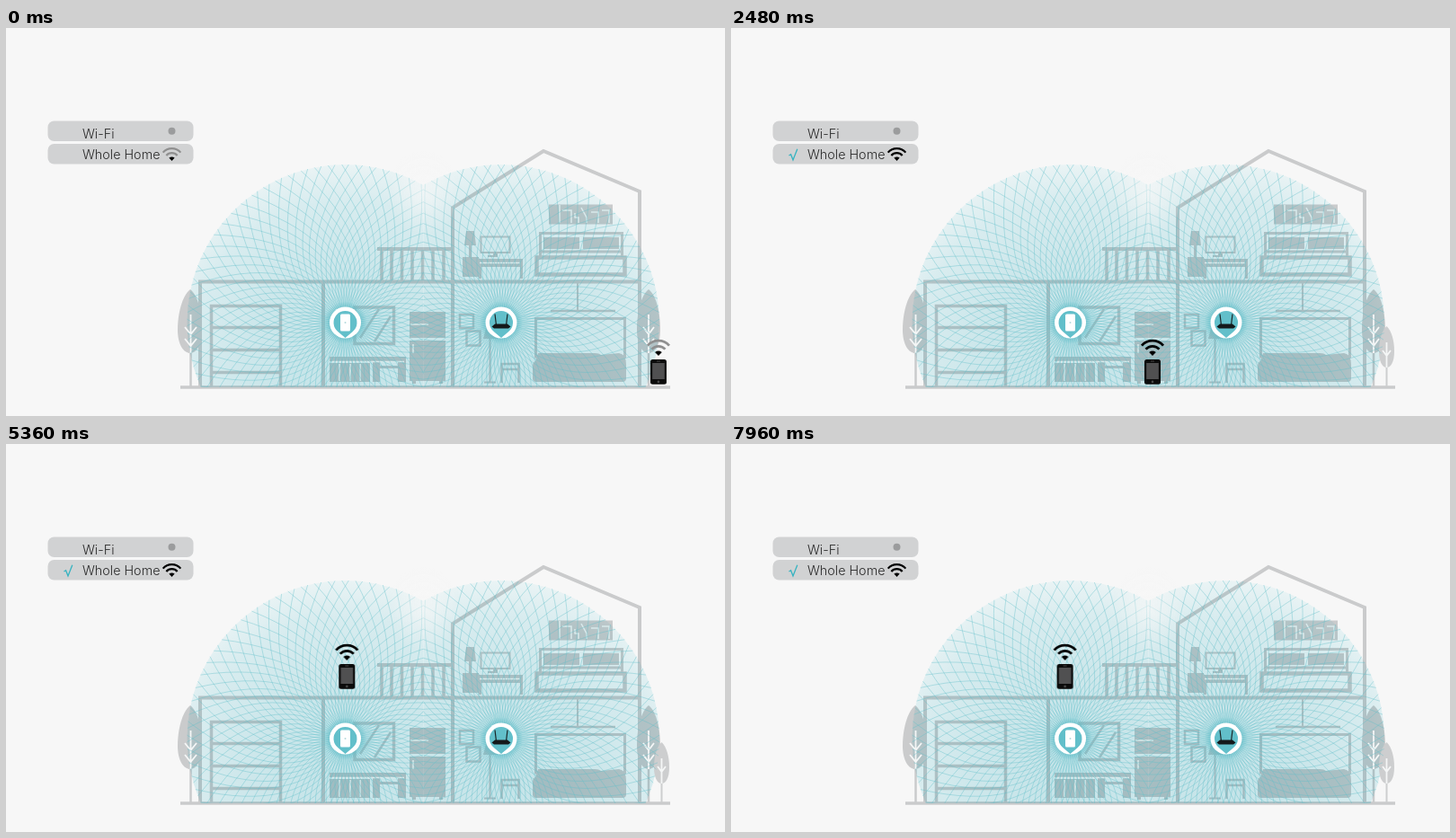
These frames come from a looping animation (800x432 px, 8000 ms). An HTML page:

```html
<!DOCTYPE html>
<html lang="en">
<head>
<meta charset="utf-8">
<title>Whole home Wi-Fi</title>
<style>
  html, body { margin: 0; width: 100%; height: 100%; overflow: hidden; background: #f7f7f7; }
  svg { display: block; width: 800px; height: 432px; }
  text { font: 300 14.35px Inter, "Open Sans", sans-serif; fill: #2b2b2b; }
  .house { mix-blend-mode: multiply; fill: none; stroke: #d1d2d3; }
  .solid { fill: #d1d2d3; stroke: none; }
  .twig { fill: none; stroke: #f4f6f6; stroke-width: 1.8; }
  .mesh { fill: none; stroke: #62bfc8; stroke-width: .6; opacity: .68; }

  .phone { animation: walk 8s linear infinite; }
  @keyframes walk {
    0% { transform: translate(726px, 0); }
    26%, 32.5% { transform: translate(469px, 0); }
    42.5% { transform: translate(395.5px, 0); animation-timing-function: cubic-bezier(.3, .15, .75, .675); }
    63.75% { transform: translate(394px, -124px); animation-timing-function: cubic-bezier(.3, .15, .75, .675); }
    83.5%, 87% { transform: translate(256px, -124px); }
    100% { transform: translate(376.1px, -124px); }
  }
  .mid, .outer { fill: none; stroke: #000; stroke-width: 2.7; }
  .mid { animation: mid 8s step-end infinite; }
  .outer { animation: outer 8s step-end infinite; }
  .tick { animation: tick 8s step-end infinite; }
  .sapling { animation: sapling 8s linear infinite; }
  @keyframes mid { 0% { stroke: #8f8f8f; } 3.5%, 100% { stroke: #000; } }
  @keyframes outer { 0% { stroke: #8f8f8f; } 7%, 100% { stroke: #000; } }
  @keyframes tick { 0% { opacity: 0; } 7.5%, 100% { opacity: 1; } }
  @keyframes sapling { 0%, 1% { opacity: 0; } 11%, 100% { opacity: 1; } }
</style>
</head>
<body>
<svg viewBox="0 0 800 432">
  <defs>
    <radialGradient id="teal" cy=".6" r=".61">
      <stop offset="0" stop-color="#c3e3e8"/>
      <stop offset=".5" stop-color="#cde7eb"/>
      <stop offset=".8" stop-color="#d8ecef"/>
      <stop offset="1" stop-color="#ebf4f5"/>
    </radialGradient>
    <radialGradient id="haze">
      <stop offset="0" stop-color="#f7f7f7" stop-opacity=".6"/>
      <stop offset="1" stop-color="#f7f7f7" stop-opacity="0"/>
    </radialGradient>
    <radialGradient id="glow">
      <stop offset=".65" stop-color="#5fbcc7" stop-opacity=".7"/>
      <stop offset="1" stop-color="#5fbcc7" stop-opacity="0"/>
    </radialGradient>
    <clipPath id="left"><path d="M190 140H464.500V400H190Z"/></clipPath>
    <clipPath id="right"><path d="M464.500 140H740V400H464.500Z"/></clipPath>
    <g id="pin">
      <circle r="24" fill="url(#glow)"/>
      <circle r="17.500" fill="#fff"/>
      <path d="M0 17L-8 10.200A13 13 0 1 1 8 10.200Z" fill="#62bfca"/>
    </g>
  </defs>

  <g clip-path="url(#left)"><circle cx="377.500" cy="328" r="176" fill="url(#teal)"/></g>
  <g clip-path="url(#right)"><circle cx="551" cy="328" r="176" fill="url(#teal)"/></g>

  <g class="house">
    <!-- trees -->
    <g class="solid">
      <path d="M205 291C214 298 218 318 218 336C218 353 212 362 205 362S191 353 191 336C191 318 196 298 205 291Z"/>
      <path d="M715 291C724 298 728 318 728 336C728 353 722 362 715 362S702 353 702 336C702 318 706 298 715 291Z"/>
    </g>
    <path stroke-width="2.500" d="M205.500 360V399M715 360V399"/>
    <!-- walls -->
    <path stroke-width="3.500" d="M194 400H739"/>
    <path stroke-width="4" d="M497 400V200L598 137L705 182V400M216 400V282.500H705M353 282V400"/>
    <path stroke-width="4" d="M413 246H497"/>
    <path stroke-width="3.500" d="M418 247V281M429 247V281M440.500 247V281M452 247V281M463.500 247V281M475 247V281M487 247V281"/>
    <!-- shelf -->
    <path stroke-width="3.500" d="M228.500 399V309.500H305.500V399M229 333.500H305M229 358.500H305M229 383.500H305"/>
    <!-- kitchen -->
    <path stroke-width="3.500" d="M388 311H431.500V351.500H388Z"/>
    <path stroke-width="2.500" d="M394 345L415 313M410 349L428 321"/>
    <g class="solid">
      <path d="M360 366H445V371H360ZM360 373H405V394H360ZM408 371H416V394H408ZM436 371H445V394H436ZM416 376H436V379H416Z"/>
      <path d="M449 316H489V345H449ZM449 348H489V393H449ZM452 393H456V396H452ZM482 393H486V396H482Z"/>
    </g>
    <!-- living room -->
    <path stroke-width="2.500" d="M505 319H520V334H505ZM512.500 337.500H527.500V353.500H512.500Z"/>
    <path stroke-width="2" d="M538.500 345V394M532 394.500H545M636 283V314"/>
    <path class="solid" d="M535 331H544L547 346H531Z"/>
    <path stroke-width="2.500" d="M606 315H678M551.500 395V374H570.500V395M551 380H571"/>
    <path stroke-width="3" d="M589.500 323.500H688.500V366H589.500Z"/>
    <path class="solid" d="M592 362H655Q660 362 662 364L682 362Q690 363 690 375V390Q690 394 686 394H590Q586 394 586 390V377Q586 372 589 371Z"/>
    <!-- bedroom -->
    <g class="solid">
      <path d="M512 226H521L523 242H510ZM515 242H518V255H515ZM508 255H526V277H508Z"/>
      <path d="M526 257H575V266H526ZM572 266H575V279H572ZM526 266H529V279H526ZM542 250H547V255H536V253H542Z"/>
      <path d="M604 196.500H675V218.500H604Z"/>
    </g>
    <path stroke-width="2" d="M528.500 232.500H560.500V250H528.500Z"/>
    <path stroke-width="3" d="M594.500 254V228.500H685.500V254M595 249H685"/>
    <path stroke-width="4.500" d="M590.500 255.500H688.500V274.500H590.500Z"/>
    <path class="solid" d="M598 233H638V246H598ZM642 233H682V246H642Z"/>
  </g>
  <g fill="none" stroke="#d9eaec" stroke-width="1.500">
    <path d="M616 197V217M619 203H629V217M633 206V211H637V217M640 200L646 211V217M651 205H659V217M663 203H671V217"/>
    <path d="M527 261.500H572M450 330H470M453 352V362M363 371.500H443M371 374V393M383 374V393M394 374V393"/>
  </g>
  <path class="twig" d="M205.500 362V319M199 333L205.500 341L212 333M199 346L205.500 354L212 346"/>
  <path class="twig" d="M715 362V319M709 333L715 341L721 333M709 346L715 354L721 346"/>
  <g class="sapling">
    <path d="M729.500 332C735 337 738 348 738 360C738 372 734 378 729.500 378S721 372 721 360C721 348 724 337 729.500 332Z" fill="#cdcecf"/>
    <path d="M729.500 377V399" stroke="#cdcecf" stroke-width="2"/>
    <path class="twig" d="M729.500 378V350M725 359L729.500 365L734 359"/>
  </g>

  <g clip-path="url(#left)"><path class="mesh" data-x="377.500"/></g>
  <g clip-path="url(#right)"><path class="mesh" data-x="551"/></g>
  <ellipse cx="464.500" cy="184" rx="42" ry="48" fill="url(#haze)"/>

  <use href="#pin" x="377.500" y="328"/>
  <rect x="372" y="318.500" width="11" height="19" rx="1.500" fill="#fff"/>
  <circle cx="377.500" cy="328" r="1" fill="#b5d9dd"/>
  <use href="#pin" x="551" y="328"/>
  <path d="M545.500 331L544 318.500M556.500 331L558 318.500" stroke="#1b2426" stroke-width="1.200"/>
  <path d="M544 329.500H558L561.500 332.500L559 334.500H543L540.500 332.500Z" fill="#14191b"/>

  <g fill="#d1d2d3">
    <rect x="46.500" y="103.500" width="162" height="22.500" rx="7"/>
    <rect x="46.500" y="129" width="162" height="22.500" rx="7"/>
  </g>
  <text x="85" y="122.500">Wi-Fi</text>
  <text x="85" y="146">Whole Home</text>
  <circle cx="184.500" cy="114.700" r="4" fill="#9b9c9d"/>
  <g class="wifi" transform="translate(184.500 -151.400) scale(.82)"></g>
  <path class="tick" d="M64.500 142L66.600 140.800L69 147L73.800 134.800" fill="none" stroke="#35b3c1" stroke-width="1.300"/>

  <g class="phone">
    <g class="wifi"></g>
    <rect x="-9" y="369" width="18" height="27.800" rx="2.500" fill="#0b0b0b"/>
    <rect x="-6.800" y="373" width="13.600" height="18" fill="#505051"/>
    <path d="M-2 371H2" stroke="#555" stroke-width=".8"/>
    <circle cy="393.900" r="1.300" fill="#4a4a4a"/>
  </g>
</svg>
<script>
  const R = 176, RAYS = 72, TWIST = 0.72;

  // Rays leave the centre straight, then bend both ways towards the rim.
  function mesh(cx, cy) {
    const at = (r, a) => (cx + r * Math.cos(a)).toFixed(1) + " " + (cy + r * Math.sin(a)).toFixed(1);
    let d = "";
    for (let i = 0; i < RAYS; i++) {
      const a = i / RAYS * 2 * Math.PI;
      for (const side of [-1, 1]) {
        d += `M${at(17, a)}Q${at(R * 0.55, a)} ${at(R, a + side * TWIST)}`;
      }
    }
    return d;
  }

  for (const path of document.querySelectorAll(".mesh")) {
    path.setAttribute("d", mesh(+path.dataset.x, 328));
  }

  for (const icon of document.querySelectorAll(".wifi")) {
    icon.innerHTML = `
      <path class="outer" d="M-12 353.700A15.800 15.800 0 0 1 12 353.700"/>
      <path class="mid" d="M-7.500 357.700A10 10 0 0 1 7.500 357.700"/>
      <path d="M-3.800 361Q0 358.200 3.800 361L0 365Z"/>`;
  }
</script>
</body>
</html>
```
